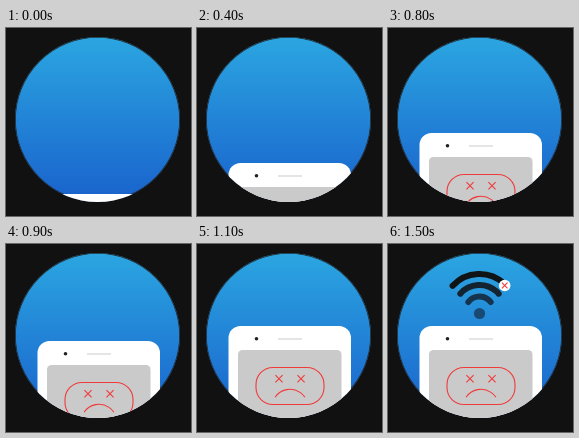
Animation, 185 px wide and 188 px high, one loop 1600 ms. Source, as an HTML page with a canvas:

```html
<!DOCTYPE html>
<html lang="en">
<head>
<meta charset="utf-8">
<title>Lost connection</title>
<style>
html, body { margin: 0; width: 100%; height: 100%; overflow: hidden; background: #111; }
canvas { display: block; width: 185px; height: 188px; }
</style>
</head>
<body>
<canvas id="stage" width="185" height="188"></canvas>
<script>
const ctx = document.getElementById('stage').getContext('2d');
const LOOP = 1600, STEP = 100;
const CENTER = 91.5, RADIUS = 82.5;
const RED = '#f03a3a';

const sky = ctx.createLinearGradient(0, 9, 0, 174);
sky.addColorStop(0, '#2ba6e1');
sky.addColorStop(1, '#1962cc');

function disc(x, y, r, color) {
  ctx.beginPath();
  ctx.arc(x, y, r, 0, Math.PI * 2);
  ctx.fillStyle = color;
  ctx.fill();
}

function box(x, y, w, h, r) {
  ctx.beginPath();
  ctx.roundRect(x, y, w, h, r);
}

function stroke(color, width, cap = 'butt') {
  ctx.strokeStyle = color;
  ctx.lineWidth = width;
  ctx.lineCap = cap;
  ctx.stroke();
}

function cross(x, y, half) {
  ctx.beginPath();
  ctx.moveTo(x - half, y - half);
  ctx.lineTo(x + half, y + half);
  ctx.moveTo(x + half, y - half);
  ctx.lineTo(x - half, y + half);
  stroke(RED, 1.1);
}

function arch(x, y, r, spread, color, width, cap) {
  ctx.beginPath();
  ctx.arc(x, y, r, -Math.PI / 2 - spread, -Math.PI / 2 + spread);
  stroke(color, width, cap);
}

function drawSignal(drop) {
  ctx.save();
  ctx.translate(0, drop);
  arch(CENTER, 66.5, 36.5, 0.83, '#111416', 6, 'round');
  arch(CENTER, 66.5, 25.5, 0.85, '#13232f', 6, 'round');
  arch(CENTER, 66.5, 14, 0.92, '#16344d', 6, 'round');
  disc(CENTER, 69.5, 5.6, '#194a74');
  disc(116.7, 41.5, 5.8, '#fff');
  cross(116.7, 41.5, 2.8);
  ctx.restore();
}

function drawPhone(top) {
  ctx.save();
  ctx.translate(0, top);
  box(31.5, 0, 122.5, 200, 12);
  ctx.fillStyle = '#fff';
  ctx.fill();

  disc(59.5, 12.8, 1.8, '#222');
  ctx.fillStyle = '#ccc';
  ctx.fillRect(81, 12.5, 24, 1);

  box(41, 24, 103.5, 160, 4.5);
  ctx.fillStyle = '#cacaca';
  ctx.fill();

  box(59, 41.5, 68, 37, 17);
  stroke(RED, 1.1);
  cross(82, 52.7, 3.6);
  cross(104, 52.7, 3.6);
  arch(93, 81.3, 18, 0.98, RED, 1.1);
  ctx.restore();
}

function draw(now) {
  const step = Math.floor((now % LOOP) / STEP);
  ctx.fillStyle = '#111';
  ctx.fillRect(0, 0, 185, 188);

  ctx.save();
  ctx.beginPath();
  ctx.arc(CENTER, CENTER, RADIUS, 0, Math.PI * 2);
  ctx.clip();
  ctx.fillStyle = sky;
  ctx.fillRect(0, 0, 185, 188);
  ctx.beginPath();
  ctx.arc(CENTER, CENTER, RADIUS, 0, Math.PI * 2);
  stroke('#222a30', 1.6);
  if (step >= 12) drawSignal((15 - step) * 16);
  drawPhone(step ? Math.floor(165 - Math.min(step, 11) * 7.5) : 166);
  ctx.restore();
}

const start = performance.now();
function tick() {
  draw(performance.now() - start);
  requestAnimationFrame(tick);
}
tick();
</script>
</body>
</html>
```
